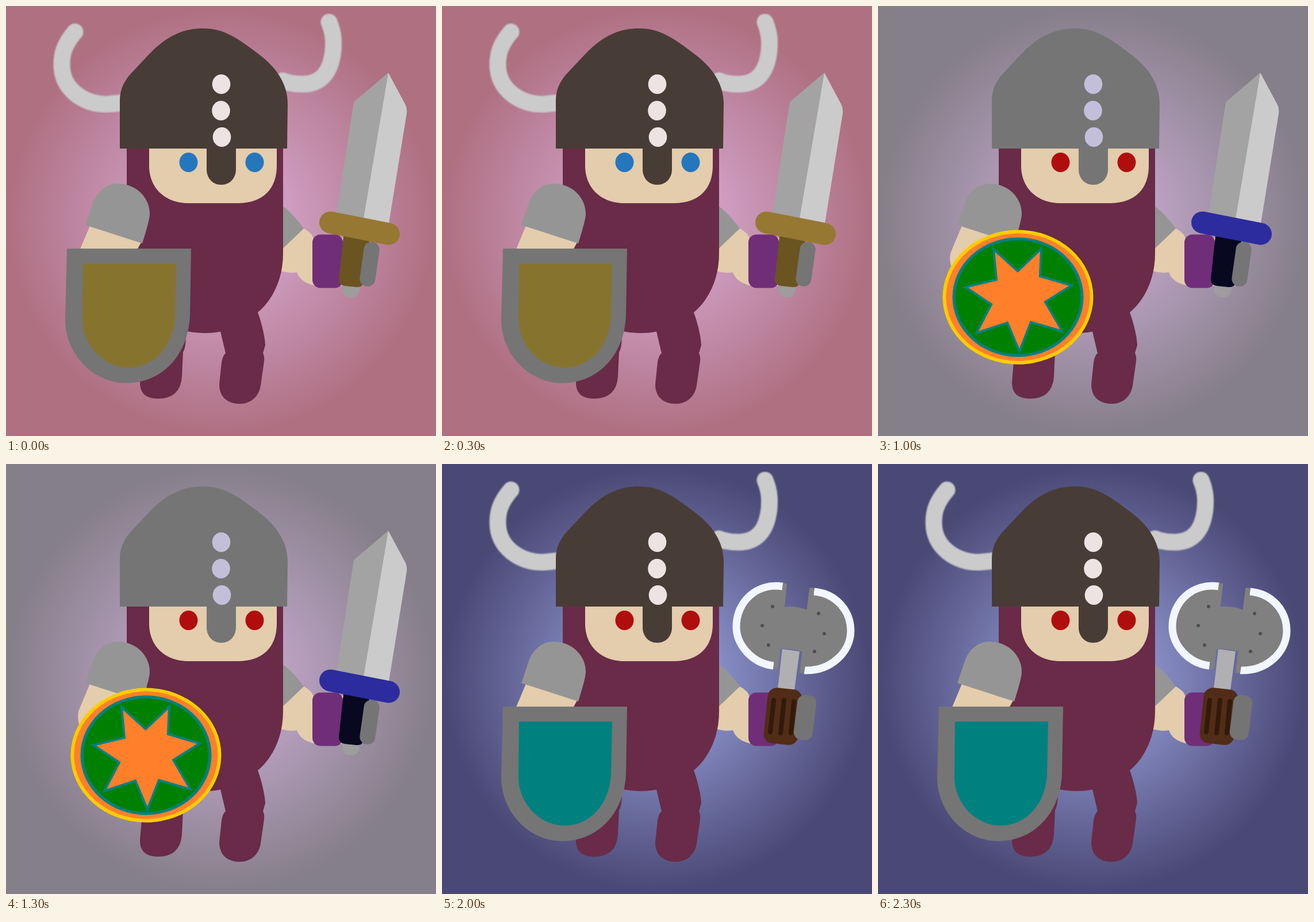
An HTML page that plays this animation: 748x748 px, repeating every 2500 ms.

```html
<!DOCTYPE html>
<html lang="en">
<head>
<meta charset="utf-8">
<title>Warrior wardrobe</title>
<style>
  html, body { margin: 0; width: 100%; height: 100%; overflow: hidden; }
  svg { display: block; width: 100vw; height: 100vh; }
</style>
</head>
<body>
<svg id="stage" viewBox="0 0 748 748"></svg>
<script>
const STEP = 500;
const SKIN = '#e3cdac', STEEL = '#757575', WINE = '#692b47', RED = '#b00e0e';

const path = (d, fill, extra = '') => `<path d="${d}" fill="${fill}" ${extra}/>`;
const line = (d, color, width, extra = '') =>
  path(d, 'none', `stroke="${color}" stroke-width="${width}" stroke-linecap="round" ${extra}`);
const oval = (x, y, rx, ry, fill) =>
  `<ellipse cx="${x}" cy="${y}" rx="${rx}" ry="${ry}" fill="${fill}"/>`;
const slab = (x, y, w, h, r, fill, turn = 0) =>
  `<rect x="${x - w / 2}" y="${y - h / 2}" width="${w}" height="${h}" rx="${r}" fill="${fill}" transform="rotate(${turn} ${x} ${y})"/>`;

const kiteShield = color => () =>
  path('M106 422H322L320 540C316 614 265 656 210 656C150 656 103 605 103 545Z', STEEL) +
  path('M134 448H296L294 542C290 595 255 629 213 629C170 629 133 590 133 545Z', color);

const disc = (rx, ry, fill) => oval(243.5, 506.5, rx, ry, fill);

const pentagonShield = () =>
  disc(131, 117, '#4f1515') + disc(125, 111, '#800000') + disc(108, 99, '#d35400') +
  path('M238 453L300 488L286 553L217 559L187 499Z', '#4f1515');

const starShield = () =>
  disc(131, 117, '#ffcc00') + disc(125, 111, '#ff7f2a') + disc(114, 104, '#008080') + disc(108.5, 99, '#008000') +
  path('M201 423L243 461L284 422L282 470L337 486L291 515L321 566L266 550L246 601L225 551L171 569L197 519L152 489L206 476Z',
    '#ff7f2a', 'stroke="#008080" stroke-width="4"');

const sword = (guard, grip) => () =>
  slab(600, 490, 30, 34, 14, '#9e9c9d', 5) +
  path('M587 400L632 408L623 479Q620 490 610 489L590 487Q578 485 579 474Z', grip) +
  slab(632.5, 449, 27, 78, 13, STEEL, 8) +
  path('M665 116L605 167L575 360L622 370Z', '#a3a3a3') +
  path('M665 116L695 172Q698 179 697 187L666 378L622 370Z', '#cbcbcb') +
  line('M564 376.5L666 396.5', guard, 38);

const axe = () => {
  const left = 'M593 213C547 206 512 240 512 283C512 315 540 347 577 351';
  const right = 'M647 222C685 225 711 255 711 290C711 328 675 361 630 359';
  const rivets = [[575, 248], [557, 281], [568, 315], [655, 260], [665, 295], [648, 326]];
  return path(left + 'L584 355L588 322L600 208Z', '#808080') +
    path(right + 'L623 362L639 216Z', '#808080') +
    path('M590 249Q617 245 641 256L630 327Q606 320 580 322Z', '#808080') +
    line(left, '#f2f6ff', 13, 'style="stroke-linecap:butt"') +
    line(right, '#f2f6ff', 13, 'style="stroke-linecap:butt"') +
    path('M593 207L600 208L595 252H588ZM580 318H589L584 357H576Z' +
      'M640 215L648 216L642 258H634ZM627 322L636 324L630 364L622 363Z', '#808080') +
    rivets.map(([x, y]) => oval(x, y, 3, 3, '#4e4e4e')).join('') +
    path('M592 322L622 326L613 393L584 391Z', '#b0b0b3') +
    slab(593, 439, 60, 97, 16, '#512c16', 6) +
    line('M577 411L571 466M595 411L589 468M612 413L607 468', '#321a0a', 8) +
    slab(631.5, 441, 33, 78, 13, '#747474', 7);
};

const base = {
  body: WINE, legs: WINE, sleeve: '#959595', cuff: '#702e78', eyes: RED,
  helmet: '#483c36', studs: '#eee3e3', horns: true, beard: '',
  weapon: sword('#967832', '#6a5420')
};
const looks = [
  { glow: '#dcb2de', back: '#af7082', eyes: '#2477bd', shield: kiteShield('#86742e') },
  { glow: '#d0aad8', back: '#857aac', eyes: '#2f5014', shield: pentagonShield,
    body: '#8b8371', legs: '#837b6c', sleeve: STEEL, cuff: '#8f4b23', beard: '#9e189e' },
  { glow: '#d2b0da', back: '#857f8a', shield: starShield, helmet: STEEL, studs: '#c4bfd9',
    horns: false, weapon: sword('#2c2c9e', '#080820') },
  { glow: '#9c80fb', back: '#44308c', shield: kiteShield('#86742e') },
  { glow: '#a0aae6', back: '#4a4875', shield: kiteShield('#00807f'), weapon: axe }
].map(look => ({ ...base, ...look }));

const draw = k => `
  <defs>
    <radialGradient id="glow" gradientUnits="userSpaceOnUse" cx="374" cy="374" r="370">
      <stop stop-color="${k.glow}"/><stop offset="1" stop-color="${k.back}"/>
    </radialGradient>
    <filter id="soft"><feGaussianBlur stdDeviation="1.3"/></filter>
  </defs>
  <rect width="748" height="748" fill="url(#glow)"/>` +
  (k.horns ? line('M120 45C100 68 97 85 97 102C97 145 135 171 176 171L205 168' +
    'M562 28C571 50 570 65 569 78C565 115 548 136 516 136C505 136 490 134 482 130', '#cbcbcb', 29, 'filter="url(#soft)"') : '') +
  // legs
  path('M240 570H313Q313 595 308 602L306 645Q303 683 264 683Q233 683 233 655Z', k.legs) +
  path('M373 566L385 540L438 533C446 555 451 580 451 590L447 604Q450 610 449 618L443 660C440 680 425 692 407 692C385 692 371 680 371 658L375 620Q377 608 382 604Z', k.legs) +
  // weapon arm
  path('M475 422L518 387Q533 395 535 405L588 403L584 487H540Q512 482 506 463Q493 466 475 460Z', SKIN) +
  path('M475 345Q492 352 518 387L475 428Z', k.sleeve) +
  slab(559.5, 444, 53, 93, 14, k.cuff) +
  k.weapon() +
  path('M210 240H482V430C482 474 465 510 438 533C413 557 380 569 346 569C270 569 210 515 210 430Z', k.body) +
  // shield arm
  path('M147 380L237 408L228 424L215 460H130Q123 445 126 430Z', SKIN) +
  path('M138 381L152 340C162 316 180 309 194 309C225 309 250 332 250 362Q250 372 237 413Z', k.sleeve) +
  (k.beard && path('M236 247L244 390Q250 450 362 450C420 447 470 430 476 400Q481 370 481 247Z', k.beard)) +
  path('M249 240V278C249 315 275 343 318 343H403C447 343 471 318 471 278V240Z', SKIN) +
  oval(317.5, 272, 16, 17, k.eyes) + oval(432.5, 272, 16, 17, k.eyes) +
  path('M198 248V165C198 148 203 135 215 120L245 88C280 50 310 39 343 39C380 39 405 57 445 88C475 112 490 140 490 170L489 248H400V284C400 300 389 311 374.5 311C360 311 349 300 349 284V248Z', k.helmet) +
  [[374.5, 136], [374, 182], [375.5, 228]].map(([x, y]) => oval(x, y, 15.8, 17, k.studs)).join('') +
  k.shield();

const stage = document.getElementById('stage');
let shown = -1;
function tick() {
  const index = Math.floor(performance.now() / STEP) % looks.length;
  if (index !== shown) stage.innerHTML = draw(looks[shown = index]);
  requestAnimationFrame(tick);
}
tick();
</script>
</body>
</html>
```
